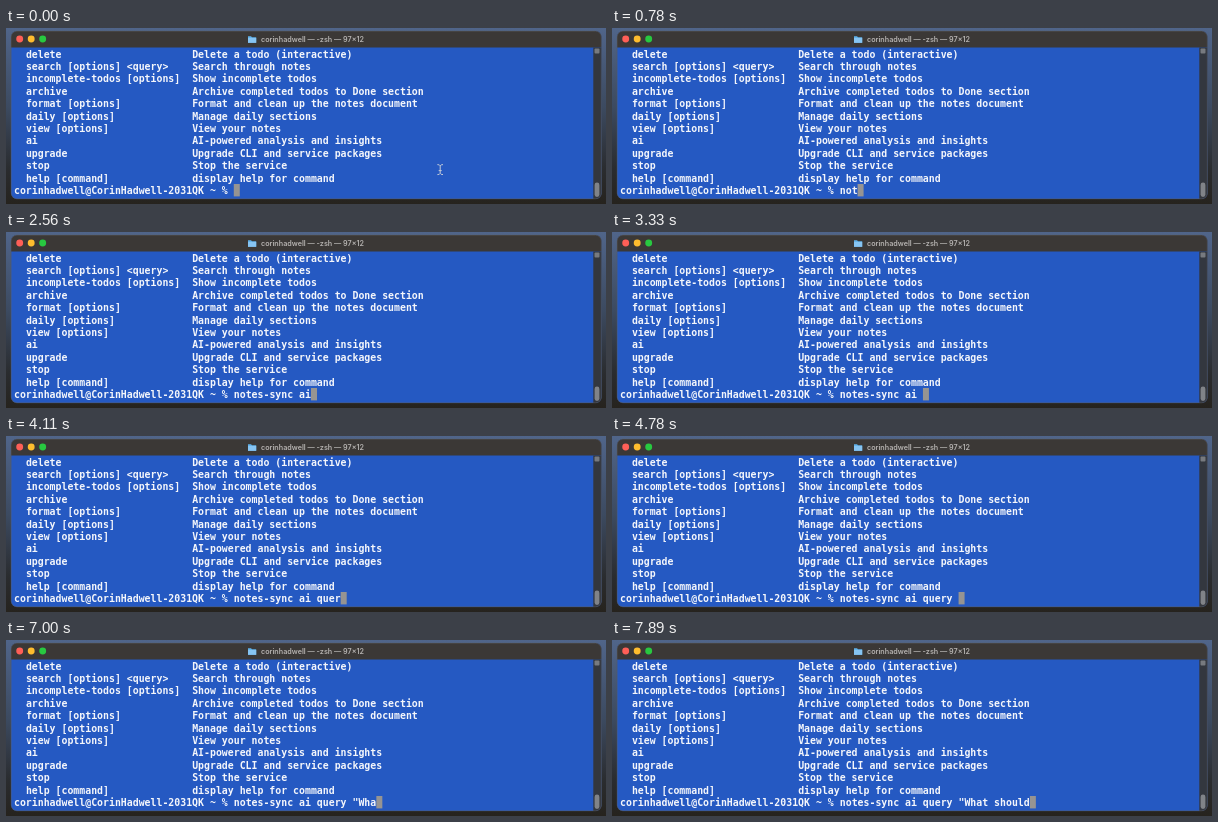
Animation, 600 px wide and 176 px high, one loop 8000 ms. Source, as an HTML page:

```html
<!DOCTYPE html>
<html lang="en">
<head>
<meta charset="utf-8">
<title>Terminal</title>
<style>
  html, body { margin: 0; width: 100%; height: 100%; overflow: hidden; background: #26231e; }
  svg { display: block; width: 600px; height: 176px; }
  .mono { font: bold 9.867px "DejaVu Sans Mono", monospace; fill: #f4f6fb; white-space: pre; }
  .title { font: 600 7.2px Inter, sans-serif; fill: #b5b2b0; }
</style>
</head>
<body>
<svg viewBox="0 0 600 176">
  <defs>
    <linearGradient id="wall" x2="0" y2="1">
      <stop offset="0" stop-color="#50658a"/>
      <stop offset=".45" stop-color="#3c4a60"/>
      <stop offset=".8" stop-color="#2a2c2f"/>
      <stop offset="1" stop-color="#26231e"/>
    </linearGradient>
    <clipPath id="frame"><rect x="5" y="3" width="590.5" height="168" rx="5.8"/></clipPath>
  </defs>
  <rect width="600" height="176" fill="url(#wall)"/>
  <g clip-path="url(#frame)">
    <rect x="5" y="3" width="591" height="168" fill="#2559c2"/>
    <rect x="5" y="3" width="591" height="16.5" fill="#3b3836"/>
    <rect x="587.3" y="19.5" width="9" height="152" fill="#33373f"/>
    <rect x="588.5" y="20.5" width="5" height="5" rx="1" fill="#777a7f"/>
    <rect x="588.6" y="154.5" width="4.8" height="14.5" rx="2.4" fill="#808388"/>
  </g>
  <rect x="5.2" y="3.2" width="590.1" height="167.6" rx="5.8" fill="none" stroke="#5b5b5c" stroke-width=".5"/>
  <circle cx="13.7" cy="11" r="3.45" fill="#fe5f57"/>
  <circle cx="25.2" cy="11" r="3.45" fill="#febc2e"/>
  <circle cx="36.7" cy="11" r="3.45" fill="#28c840"/>
  <path d="M242 8.2h3l1 1h4.2v5.6H242z" fill="#62b2ea"/>
  <path d="M242 10h8.2v4.8H242z" fill="#86c4f2"/>
  <text class="title" id="title" x="306.5" y="13.6" text-anchor="middle"></text>
  <g id="rows"></g>
  <rect id="cursor" y="156" width="6" height="12.4" fill="#969492"/>
  <path id="beam" d="M431.4 136.6q2.4 0 2.8 1.2q.4-1.2 2.8-1.2M434.2 137.8v7.6M431.4 146.6q2.4 0 2.8-1.2q.4 1.2 2.8 1.2M432.7 142.6h3"
    fill="none" stroke="#c3cbd9"/>
</svg>
<script>
const LOOP = 8000, STEP = 1000 / 9;
const LEFT = 8, CELL = 5.94, PITCH = 12.4, BASE = 29.5;
const user = "corinhadwell";
const prompt = user + "@CorinHadwell-2031QK ~ % ";
const help = [
  ["delete", "Delete a todo (interactive)"],
  ["search [options] <query>", "Search through notes"],
  ["incomplete-todos [options]", "Show incomplete todos"],
  ["archive", "Archive completed todos to Done section"],
  ["format [options]", "Format and clean up the notes document"],
  ["daily [options]", "Manage daily sections"],
  ["view [options]", "View your notes"],
  ["ai", "AI-powered analysis and insights"],
  ["upgrade", "Upgrade CLI and service packages"],
  ["stop", "Stop the service"],
  ["help [command]", "display help for command"]
];
// Typed text, time of its first key, time between keys (ms)
const bursts = [
  ["notes-", 480, 120],
  ["sync ", 1200, 130],
  ["ai ", 2270, 160],
  ["query ", 3500, 160],
  ['"What ', 6400, 170],
  ["should", 7340, 100]
];
const $ = id => document.getElementById(id);

function addText(col, row, text) {
  const el = document.createElementNS("http://www.w3.org/2000/svg", "text");
  el.setAttribute("class", "mono");
  el.setAttribute("x", LEFT + col * CELL);
  el.setAttribute("y", BASE + row * PITCH);
  el.textContent = text;
  $("rows").append(el);
  return el;
}

function typedAt(t) {
  return bursts.map(([text, from, gap]) =>
    text.slice(0, Math.max(0, Math.floor((t - from) / gap) + 1))).join("");
}

$("title").textContent = user + " — -zsh — 97×12";
help.forEach(([name, info], row) => {
  addText(2, row, name);
  addText(30, row, info);
});
addText(0, help.length, prompt);
const input = addText(prompt.length, help.length, "");

function draw(now) {
  const t = Math.floor((now % LOOP) / STEP + 0.05) * STEP;
  const typed = typedAt(t);
  input.textContent = typed;
  $("cursor").setAttribute("x", LEFT + (prompt.length + typed.length) * CELL);
  $("beam").style.display = typed ? "none" : "";
}

const start = performance.now();
function tick() {
  draw(performance.now() - start);
  requestAnimationFrame(tick);
}
tick();
</script>
</body>
</html>
```
